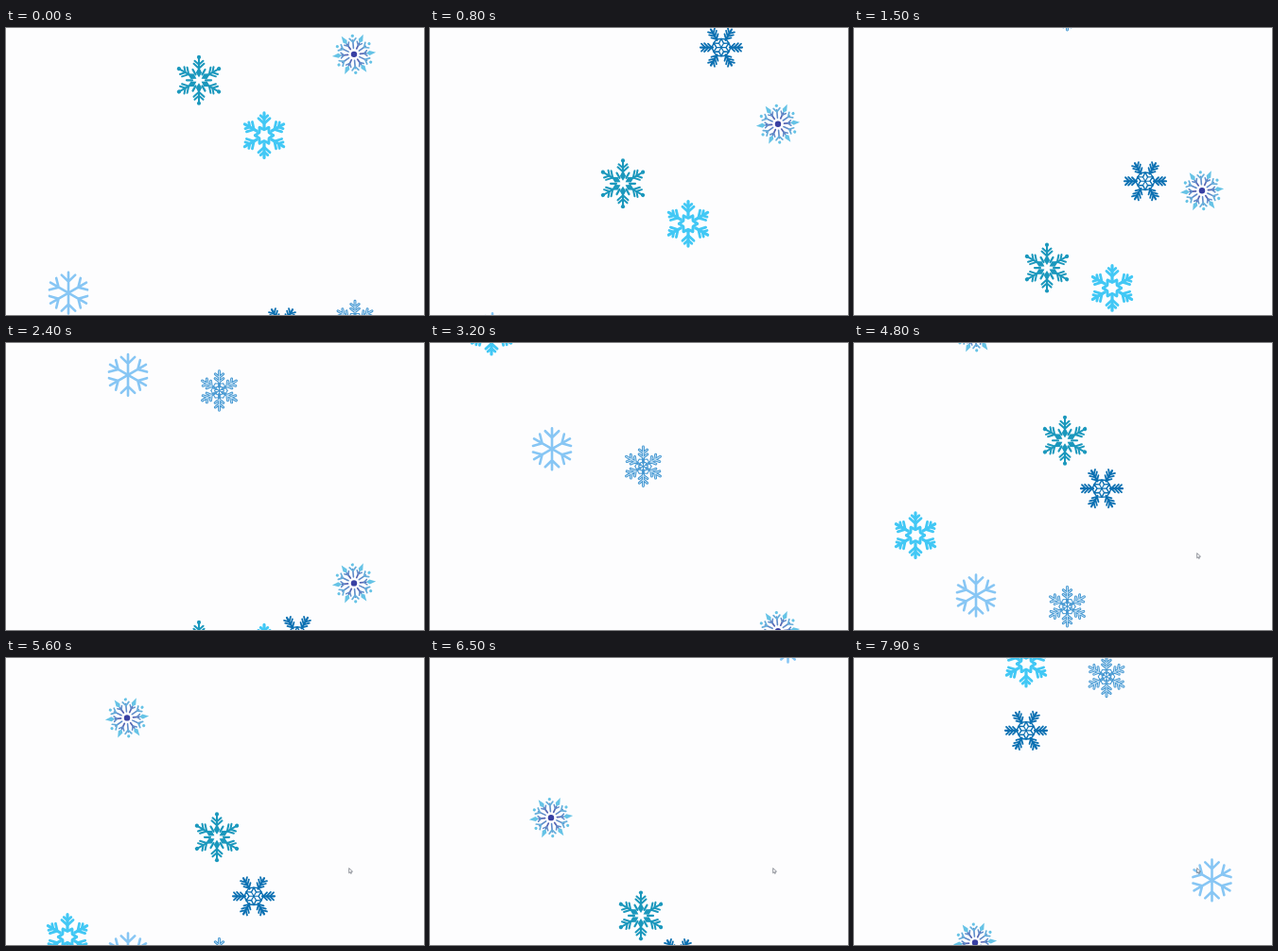
Write an HTML page that moves like this. It is 442 px wide and 304 px high and loops after 8000 ms.

```html
<!DOCTYPE html>
<html lang="en">
<head>
<meta charset="utf-8">
<title>Snowfall</title>
<style>
  html, body { margin: 0; width: 100%; height: 100%; overflow: hidden; background: #fdfdfe; }
  svg { display: block; width: 442px; height: 304px; }
</style>
</head>
<body>
<svg id="sky" viewBox="0 0 442 304" fill="none" stroke-linecap="round" stroke-linejoin="round"></svg>
<script>
const LOOP = 8000, STEP = 100;
const TOP = -50, BOTTOM = 325;
const OVERLAP = .28;      // a flake's next drop begins this long before the last one ends
const POINTER_IN = 4300;

// Six copies of an upward arm, turned about the centre.
const six = (arm, turn = 0) =>
  Array.from({ length: 6 }, (_, i) => `<g transform="rotate(${i * 60 + turn})">${arm}</g>`).join('');

const line = (d, color, width) => `<path d="${d}" stroke="${color}" stroke-width="${width}"/>`;
const shape = (d, color) => `<path d="${d}" fill="${color}"/>`;
const dot = (y, r, color) => `<circle cy="${y}" r="${r}" fill="${color}"/>`;
// A pair of twigs leaving the arm at radius r.
const twigs = (r, out, up) => `M${-out} ${-r - up}L0 ${-r}L${out} ${-r - up}`;

function tealArt() {
  const c = '#1b98bd';
  return six(
    line('M0-12V-24', c, 2) +
    line(twigs(12.5, 5.5, 5) + twigs(16.5, 4.5, 4), c, 2) +
    dot(-24.4, 2.1, c) +
    shape('M0-3L3.2-8L0-14L-3.2-8Z', c)) +
    six(line('M0-7V-13', c, 2.2), 30);
}

function cyanArt() {
  const c = '#42c8f5';
  return six(
    line('M0-9V-23.8', c, 3.2) +
    line(twigs(12.5, 6, 5.5) + twigs(17.5, 3.8, 3.4), c, 2.8) +
    line('M-4.8-8.3L0-6L4.8-8.3', c, 3));
}

function violetArt() {
  const sky = '#66c3e6', blue = '#5f8cca';
  const rays = six(
    line('M0-6.5V-13', '#5667b4', 1.7) +
    line(twigs(10.5, 2.8, 3.2), blue, 1.5) +
    shape('M0-13L2.5-16.5L0-23.2L-2.5-16.5Z', sky), 25);
  const between = six(
    line('M0-6.5V-15', blue, 1.6) +
    line(twigs(13, 3.4, 3.8), '#66aedb', 1.7) +
    dot(-19.5, 1.6, sky), 55);
  return rays + between + '<circle r="3.2" fill="#3940a3"/>';
}

function paleArt() {
  return six(line('M0 0V-21.9' + twigs(12, 7.2, 7), '#87c6f4', 2.6));
}

function navyArt() {
  const c = '#0b70b2';
  return six(
    line('M0-9V-22', c, 2.2) +
    line(twigs(10, 4, 4) + twigs(13.5, 4.4, 4.4) + twigs(17, 4, 4), c, 1.8) +
    line('M-4.6-8L0-5L4.6-8L0-10Z', c, 1.4) +
    line('M0 0V-5', c, 1.1), 30);
}

function frostArt() {
  const edge = '#4698d2', pale = '#c3e0f4';
  const arm = 'M0-4V-20.8' + twigs(9.5, 4.4, 3.4) + twigs(14, 4.2, 3.6);
  return six(line(arm, edge, 2.9)) + six(line(arm, pale, 1)) +
    six(line('M-4.3-7.5H4.3M0 0V-8M-2.4-4.2H2.4', edge, 1));
}

// Drops are [x, duration in s] and follow one another from start.
const flakes = [
  { art: tealArt, start: -1.49, drops: [[204, 4.19], [223, 5.39]] },
  { art: cyanArt, start: -2.27, drops: [[273, 4.94], [65, 3.92], [182, 7.39]] },
  { art: violetArt, start: -1.75, drops: [[368, 5.81], [128, 4.91]] },
  { art: paleArt, start: -3.23, drops: [[66, 4.16], [129, 5.58], [378.5, 2.89]] },
  { art: navyArt, start: -2.97, drops: [[292, 3.27], [308, 2.73], [262, 4.41], [182, 3.29]] },
  { art: frostArt, start: -4.98, drops: [[369, 5.71], [225.5, 5.63], [267, 7.39]] }
];

const sky = document.getElementById('sky');
const addGroup = html => {
  const g = document.createElementNS('http://www.w3.org/2000/svg', 'g');
  g.innerHTML = html;
  return sky.appendChild(g);
};

for (const f of flakes) f.node = addGroup(f.art());
const pointer = addGroup(
  '<path d="M362.7 223V227.8L363.9 226.9L364.7 228.5L365.4 228.1L364.7 226.5L366.1 226.2Z" fill="#fff" stroke="#666b75" stroke-width=".7"/>');

const swing = p => (1 - Math.cos(Math.PI * p)) / 2;

// Position of a flake at t seconds, or null once its drops are over.
function place({ start, drops }, t) {
  for (const [x, duration] of drops) {
    const p = (t - start) / duration;
    if (p < 1) return { x, y: TOP + (BOTTOM - TOP) * swing(Math.max(0, p)) };
    start += duration - OVERLAP;
  }
  return null;
}

function draw(ms) {
  for (const flake of flakes) {
    const at = place(flake, ms / 1000);
    flake.node.style.display = at ? '' : 'none';
    if (at) flake.node.setAttribute('transform', `translate(${at.x} ${at.y.toFixed(2)})`);
  }
  pointer.style.display = ms >= POINTER_IN ? '' : 'none';
}

function tick() {
  draw(Math.floor(performance.now() % LOOP / STEP) * STEP);
  requestAnimationFrame(tick);
}
tick();
</script>
</body>
</html>
```
